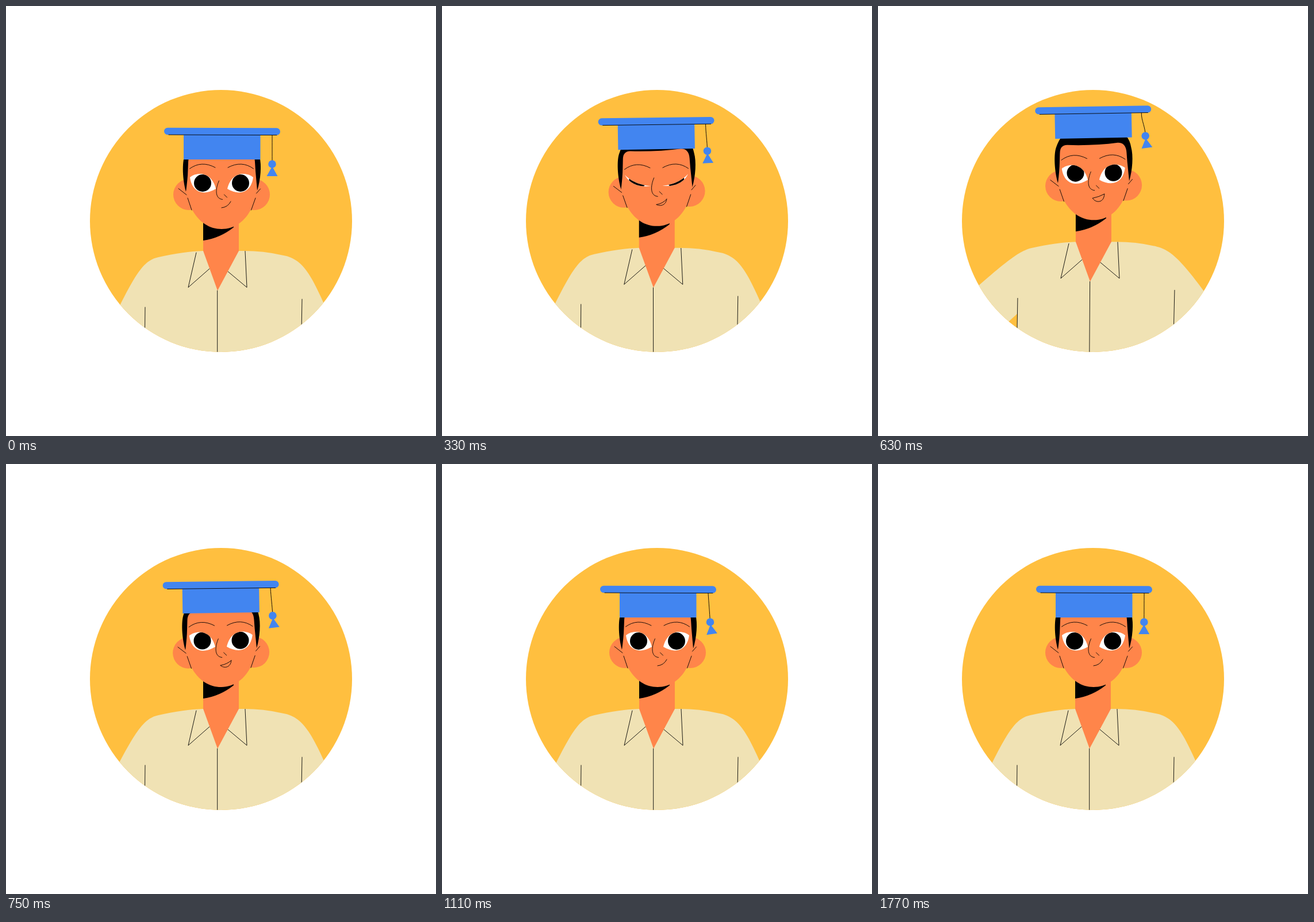
Animation of 748x748 px, one loop 1.8 s. Source, as an HTML page with a canvas:

```html
<!DOCTYPE html>
<html lang="en">
<head>
<meta charset="utf-8">
<title>Graduate</title>
<style>
html, body { margin: 0; width: 100%; height: 100%; overflow: hidden; background: #fff; }
canvas { display: block; width: 748px; height: 748px; }
</style>
</head>
<body>
<canvas id="stage" width="748" height="748"></canvas>
<script>
const ctx = document.getElementById('stage').getContext('2d');
const LOOP = 1800, STEP = 30;
const YELLOW = '#ffbf3f', SKIN = '#ff854a', BLUE = '#4285f0', SHIRT = '#f0e2b4', INK = '#000';
const RAD = Math.PI / 180;

const mix = (a, b, k) => a + (b - a) * k;

// 0 before a, 1 after b, cosine in between
function ease(t, a, b) {
  const k = Math.min(1, Math.max(0, (t - a) / (b - a)));
  return (1 - Math.cos(Math.PI * k)) / 2;
}
const pulse = (t, a, b, c, d) => ease(t, a, b) - ease(t, c, d);

// The whole pose follows from the time: crouch, jump, settle.
function poseAt(t) {
  const squat = pulse(t, 0, 210, 210, 480);
  const jump = pulse(t, 210, 480, 480, 750);
  const sway = pulse(t, 0, 210, 840, 1080);
  return {
    dx: 2.3 * jump - 2 * squat,
    dy: 18 * squat - 38 * jump,
    tilt: -.7 * sway - .4 * squat,
    hatTilt: -.4 * pulse(t, 420, 630, 630, 840),
    hatLift: -25.5 * Math.max(0, 1 - ((t - 523) / 273) ** 2),
    reach: pulse(t, 345, 540, 540, 780),
    blink: pulse(t, 60, 180, 270, 550) + pulse(t, 780, 960, 960, 1080),
    smile: pulse(t, 270, 400, 690, 840),
    look: 1.7 * pulse(t, 300, 520, 630, 840),
    float: pulse(t, 270, 420, 630, 800),
    swing: -8.8 * ease(t, 700, 880) * Math.exp((900 - t) / 228) * Math.cos((t - 900) * Math.PI / 210)
  };
}

const path = d => new Path2D(d);
function fill(d, color) {
  ctx.fillStyle = color;
  ctx.fill(path(d));
}
function line(d, width = .9) {
  ctx.lineWidth = width;
  ctx.stroke(path(d));
}
function disc(x, y, r, color) {
  ctx.beginPath();
  ctx.arc(x, y, r, 0, Math.PI * 2);
  ctx.fillStyle = color;
  ctx.fill();
}
function spin(deg, x, y) {
  ctx.translate(x, y);
  ctx.rotate(deg * RAD);
  ctx.translate(-x, -y);
}

// Shoulder point, bend and far end of a sleeve hanging at an angle.
function sleeve(x, y, deg, side) {
  const ux = side * Math.cos(deg * RAD), uy = Math.sin(deg * RAD);
  return { x, y, bx: x + 33 * ux, by: y + 33 * uy, ex: x + 140 * ux, ey: y + 140 * uy };
}

function drawBody({ dx, dy, reach }) {
  const l = sleeve(236 + 8 * reach, 443, 64 - 33 * reach, -1);
  const r = sleeve(520 - 10 * reach, 439, 67 - 19 * reach, 1);
  ctx.save();
  ctx.translate(dx, dy);
  fill(`M343 426Q310 427 265 437C${l.x} ${l.y} ${l.bx} ${l.by} ${l.ex} ${l.ey}V700H${r.ex}V${r.ey}` +
    `C${r.bx} ${r.by} ${r.x} ${r.y} 478 433Q445 425 405 426Z`, SHIRT);
  ctx.restore();

  // opening between the sleeve and the torso
  fill(`M242 ${601 - 72 * reach + dy}l-70 64h70Z`, YELLOW);

  // seams keep their lower ends still
  const seam = (x, y, foot) => `M${x + dx} ${y + dy}L${foot} 620`;
  line(seam(242, 524, 241) + seam(515, 510, 513) + seam(367.7, 495, 367.7));

  ctx.translate(dx, dy);
  line('M331 429L317 489.5L354 457M416 426.5L419 489.5L385 461');
  fill('M343 360H405V426L368 495L343 426Z', SKIN);
  fill('M343 370H396V385Q372 404 343 408Z', INK);
}

function drawEye({ blink, look }, side) {
  const m = (a, b) => mix(a, b, blink);
  const lower = `C${m(345, 340)} ${m(330, 320)} ${m(324, 326)} ${m(326, 308)} 320 298`;
  const upper = `C${m(332, 326)} ${m(288, 308)} ${m(358, 340)} ${m(288, 320)} 365 318`;
  // brow sinks with the lid
  const by = 7 * blink * blink;
  line(`M319.5 ${283 + by}Q340 ${268 + by} 364 ${281 + by}`);
  if (blink > .96) {
    line('M365 318' + lower, .6);
    return;
  }
  fill('M320 298' + upper + lower, '#fff');
  ctx.clip(path('M320 298' + upper + lower));
  disc(342 + side * look, 308 - 1.2 * look, 15, INK);
}

function drawFace(s) {
  for (const x of [318, 432]) disc(x, 328, 27, SKIN);
  fill('M313 323C307 302 306 272 311 260Q315 249 320 243Q330 236 345 236H408Q424 236 433 243' +
    'Q439 250 441 262C445 277 443 302 437 321Z', INK);
  fill('M313 323Q316 302 316.5 285L317 272Q317 257 330 257Q378 259 418 254Q432 254 433 271L434 287L437 321' +
    'Q435 338 428 350C416 376 396 388 375 388C355 388 335 377 322 351Q315 336 313 323Z', SKIN);
  line('M300 317.5L314 328.5M316 334L323 355M442.5 318L435.5 326M434 334L426.5 355');

  for (const side of [1, -1]) {
    ctx.save();
    if (side < 0) ctx.transform(-1, 0, 0, 1, 750, 0);
    drawEye(s, side);
    ctx.restore();
  }
  line('M370.5 304C365 316 362 335 376.5 336.5M379.5 328L384.5 333');

  const m = (a, b) => mix(a, b, s.smile);
  const left = `${m(375, 373)} ${m(351, 350)}`, right = `${m(391, 393.5)} ${m(340, 343)}`;
  line(`M${left}Q${m(386, 384)} ${m(350, 348)} ${right}`);
  if (s.smile > .02) line(`M${left}C${m(382, 378)} ${m(350, 359)} ${m(388, 393)} ${m(348, 359)} ${right}`);
}

function drawTassel({ float, swing }) {
  const x0 = 463 - 3.2 * float, y0 = 225;
  const x1 = 463 + 3 * float + swing, y1 = 275 - 10 * float;
  const bend = 2.5 * float;
  line(`M${x0} ${y0}C${mix(x0, x1, .35) - bend} ${mix(y0, y1, .35)} ` +
    `${mix(x0, x1, .65) + bend} ${mix(y0, y1, .6)} ${x1} ${y1}`);
  disc(x1, y1, 6.8, BLUE);
  ctx.translate(x1, y1);
  ctx.rotate((-6.5 * float - 2.4 * swing) * RAD);
  fill('M0 4L9.5 21H-9.5Z', BLUE);
}

function drawHat(s) {
  ctx.translate(0, s.hatLift);
  spin(s.hatTilt, 376, 245);
  fill('M309 224H442.5V267H309Z', BLUE);
  ctx.save();
  spin(.2, 376, 218);
  ctx.beginPath();
  ctx.roundRect(275, 212, 202, 12.4, 6.2);
  ctx.fill();
  line('M283 224.3H471');
  ctx.restore();
  drawTassel(s);
}

function draw(t) {
  const s = poseAt(t);
  ctx.fillStyle = '#fff';
  ctx.fillRect(0, 0, 748, 748);
  ctx.strokeStyle = INK;
  ctx.lineCap = 'round';

  ctx.save();
  disc(374, 374, 228, YELLOW);
  ctx.clip();
  drawBody(s);
  spin(s.tilt, 374, 400);
  drawFace(s);
  drawHat(s);
  ctx.restore();
}

const start = performance.now();
function frame(now) {
  const t = Math.max(0, now - start) % LOOP;
  draw(Math.floor(t / STEP) * STEP);
  requestAnimationFrame(frame);
}
draw(0);
requestAnimationFrame(frame);
</script>
</body>
</html>
```
